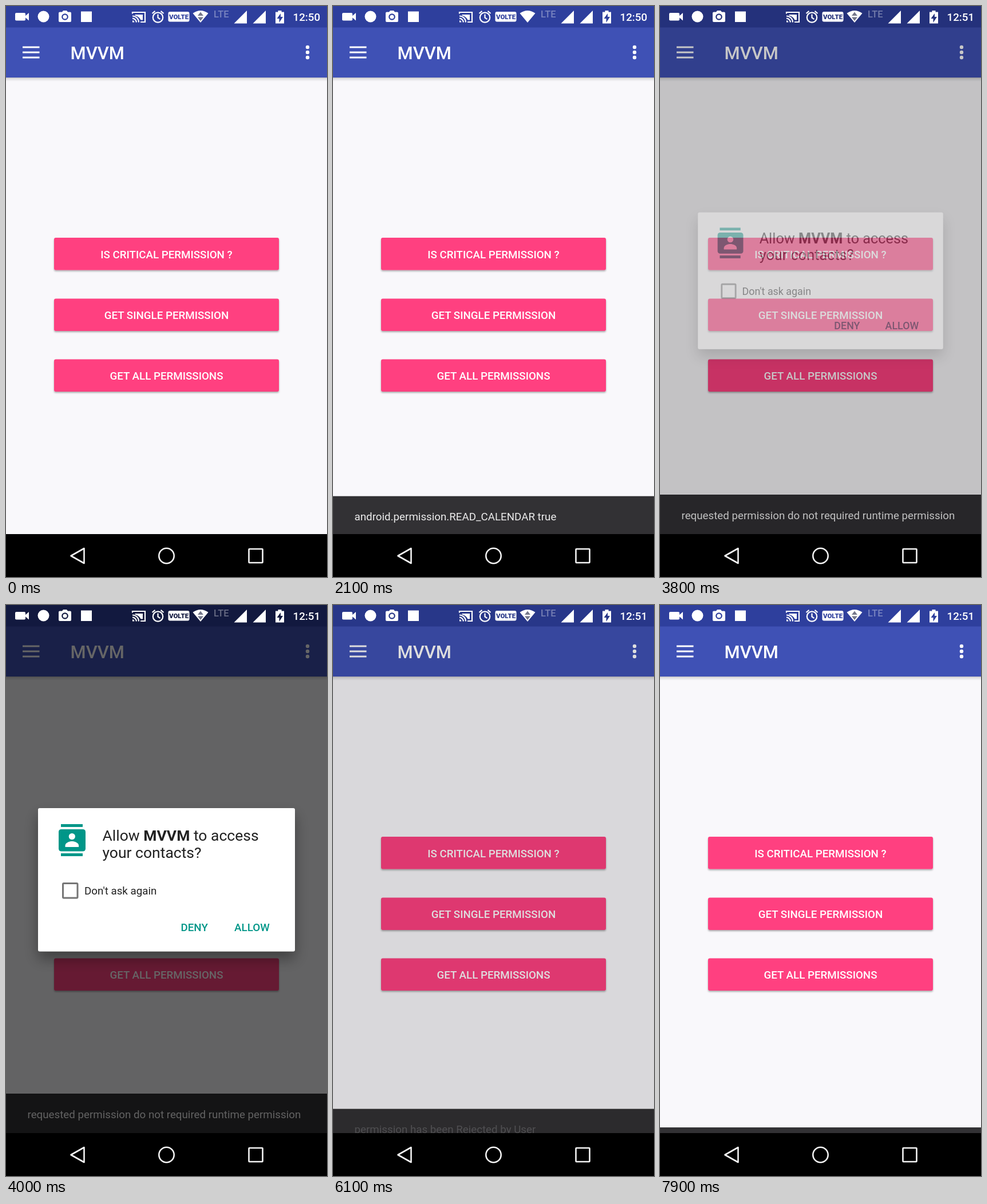
An HTML page that plays this animation: 561x998 px, repeating every 8 s.

```html
<!DOCTYPE html>
<html lang="en">
<head>
<meta charset="utf-8">
<title>Permission demo</title>
<style>
  html, body { margin: 0; width: 100%; height: 100%; overflow: hidden; background: #000; }
  svg { display: block; width: 100vw; height: 100vh; }
  text { font-family: Roboto, "Noto Sans", sans-serif; font-size: 18.75px; white-space: pre; }
  .medium { font-weight: 500; }
  .hole { fill: currentColor; }
</style>
</head>
<body>
<svg id="stage" viewBox="0 0 561 998">
  <defs>
    <linearGradient id="edge" x2="0" y2="1">
      <stop offset="0" stop-color="#000" stop-opacity=".27"/>
      <stop offset=".4" stop-color="#000" stop-opacity=".1"/>
      <stop offset="1" stop-color="#000" stop-opacity="0"/>
    </linearGradient>
    <filter id="lift" x="-5%" y="-20%" width="110%" height="150%">
      <feDropShadow dx="0" dy="2" stdDeviation="1.5" flood-opacity=".32"/>
    </filter>
    <filter id="float" x="-15%" y="-20%" width="130%" height="150%">
      <feDropShadow dx="0" dy="13" stdDeviation="12" flood-opacity=".36"/>
    </filter>
    <clipPath id="denyClip"><rect x="290" y="535" width="80" height="56" rx="3"/></clipPath>
  </defs>

  <rect width="561" height="998" fill="#f9f8fb"/>
  <rect y="124" width="561" height="8" fill="url(#edge)"/>
  <rect width="561" height="125" fill="#3f51b5"/>
  <rect width="561" height="37.5" fill="#2e3f9d"/>

  <g fill="#fff">
    <path d="M29 70.5h29.5v3H29zM29 79.5h29.5v3H29zM29 88.5h29.5v3H29z"/>
    <text class="medium" x="112.5" y="93" style="font-size:31px">MVVM</text>
    <circle cx="527" cy="72" r="3.2"/>
    <circle cx="527" cy="81" r="3.2"/>
    <circle cx="527" cy="90" r="3.2"/>
  </g>

  <g id="buttons"></g>

  <g id="snack">
    <rect width="561" height="80" fill="#323134"/>
    <text id="message" x="37.5" y="42.5" fill="#fff"></text>
  </g>

  <rect id="dim" width="561" height="998"/>

  <g id="dialog">
    <rect x="56" y="355" width="449" height="250.5" rx="3" fill="#fff" filter="url(#float)"/>
    <g fill="#009688">
      <path d="M96 383h38v5H96zM96 434h38v5H96z"/>
      <rect x="92" y="392" width="47" height="38.5" rx="4.5"/>
    </g>
    <g fill="#fff">
      <circle cx="115.3" cy="404.5" r="5.6"/>
      <path d="M103.5 423v-2.500c0-5 7-7.500 11.800-7.500s11.800 2.500 11.800 7.500v2.500z"/>
    </g>
    <g fill="#212121">
      <text x="168.500" y="411.500" style="font-size:26.500px">Allow <tspan font-weight="700">MVVM</tspan> to access</text>
      <text x="168.500" y="442" style="font-size:26.500px">your contacts?</text>
      <text x="137" y="506">Don't ask again</text>
    </g>
    <rect x="99.500" y="486.500" width="25.500" height="25.500" rx="1.500" fill="none" stroke="#757575" stroke-width="3"/>
    <circle id="denyRipple" cx="330" cy="562" clip-path="url(#denyClip)"/>
    <g class="medium" fill="#009688">
      <text x="305.500" y="569.500">DENY</text>
      <text x="399" y="569.500">ALLOW</text>
    </g>
  </g>

  <g fill="#fff">
    <rect x="16" y="12" width="18" height="13.500" rx="2"/>
    <path d="M33 18l7-6v13.500l-7-6z"/>
    <circle cx="65.500" cy="18.500" r="10"/>
    <path d="M94 10.500h4l2-2.500h6l2 2.500h4q2 0 2 2v13.500q0 2-2 2H94q-2 0-2-2V12.500q0-2 2-2z"/>
    <circle class="hole" cx="103" cy="19" r="5.800"/>
    <circle cx="103" cy="19" r="3.600"/>
    <rect x="131" y="9.500" width="19" height="18.500"/>

    <g fill="none" stroke="#fff" stroke-width="2.200">
      <path d="M221 13.500V11h22v17h-8M221 17.500a11 11 0 0 1 11 11M221 21.700a6.800 6.800 0 0 1 6.800 6.800"/>
      <circle cx="265.500" cy="20" r="8.700"/>
      <path d="M265.500 14.500v6l4 2.600M255.500 13l5-4.200M275.500 13l-5-4.200"/>
    </g>
    <path d="M221 25.200a3.300 3.300 0 0 1 3.300 3.300H221zM225.500 15H239v9.500h-3.500q-2.500-6-10-8z"/>

    <rect x="283.500" y="10" width="37" height="17.500" rx="3"/>
    <text class="hole" x="302" y="22.800" text-anchor="middle" font-weight="800" style="font-size:11.500px">VOLTE</text>
    <path d="M326.500 12.800q13.500-9.600 27 0L340 29z"/>
    <path id="arrowUp" d="M340 10.500l5 6.500h-10z" fill="#74778a"/>
    <path id="arrowDown" d="M335 19.500h10l-5 6.500z" fill="#74778a"/>
    <text class="medium" x="363" y="20" opacity=".36" style="font-size:16.500px">LTE</text>
    <path d="M421 8v22.500h-22.500zM454 8v22.500h-22.500z"/>
    <path d="M475.500 8h6v2.500h4.500v20h-15v-20h4.500z"/>
    <path class="hole" d="M480 13v6h4l-6.500 10v-7h-4z"/>
    <text class="medium" id="clock" x="501.500" y="26"></text>
  </g>

  <rect y="923" width="561" height="75"/>
  <g fill="none" stroke="#f4f4f4" stroke-width="2.600">
    <path d="M113.500 961l23-13v26z" stroke-linejoin="round"/>
    <circle cx="280.500" cy="961" r="13.200"/>
    <rect x="424.500" y="949" width="24" height="24" rx="1"/>
  </g>
</svg>
<script>
const LOOP = 8000, STEP = 100;
const REST = 854, HIDDEN = 923, SLIDE = 250, SHOWN = 1756;
const SNACKS = [
  [314, "android.permission.READ_CALENDAR true"],
  [3200, "requested permission do not required runtime permission"],
  [6000, "permission has been Rejected by User"]
];
const BUTTONS = [
  { y: 405, label: "IS CRITICAL PERMISSION ?", tap: 60 },
  { y: 511.5, label: "GET SINGLE PERMISSION", tap: 3060 },
  { y: 617.5, label: "GET ALL PERMISSIONS" }
];

const $ = id => document.getElementById(id);
const clamp = v => Math.max(0, Math.min(1, v));
const ramp = (t, start, length) => clamp((t - start) / length);
const set = (el, attrs) => {
  for (const key in attrs) el.setAttribute(key, attrs[key]);
};

// Cubic bezier (.4, 0, .2, 1), solved by bisection
function ease(x) {
  if (x <= 0 || x >= 1) return clamp(x);
  let lo = 0, hi = 1, u;
  for (let i = 0; i < 24; i++) {
    u = (lo + hi) / 2;
    const v = 1 - u;
    const bx = 1.2 * v * v * u + 0.6 * v * u * u + u * u * u;
    if (bx < x) lo = u; else hi = u;
  }
  return u * u * (3 - 2 * u);
}

$("buttons").innerHTML = BUTTONS.map(({ y, label }, i) => `
  <clipPath id="clip${i}"><rect x="84" y="${y}" width="393" height="56.500" rx="3"/></clipPath>
  <rect x="84" y="${y}" width="393" height="56.500" rx="3" fill="#ff3f80" filter="url(#lift)"/>
  <g clip-path="url(#clip${i})">
    <rect id="press${i}" x="84" y="${y}" width="393" height="57"/>
    <circle id="ripple${i}" cx="340" cy="${y + 28}"/>
  </g>
  <text class="medium" x="280.500" y="${y + 35.5}" text-anchor="middle" fill="#fff">${label}</text>`).join("");

function drawRipples(t) {
  BUTTONS.forEach(({ tap }, i) => {
    const age = tap === undefined ? -1 : t - tap;
    const level = age < 0 ? 0 : ramp(age, 0, 120) * (1 - ramp(age, 340, 240));
    set($("press" + i), { opacity: 0.055 * level });
    set($("ripple" + i), { r: 25 + 0.265 * Math.max(0, age), opacity: 0.035 * level });
  });
  const deny = ramp(t, 5800, 200);
  set($("denyRipple"), { r: 15 + 50 * deny, opacity: 0.12 * Math.min(1, deny * 2) });
}

function drawSnack(t) {
  const [start, message] = SNACKS.filter(s => s[0] <= t).pop() || SNACKS[0];
  const age = t - start;
  const shown = ease(age / SLIDE) - ease((age - SHOWN) / SLIDE);
  const y = HIDDEN - (HIDDEN - REST) * shown;
  $("message").textContent = message;
  set($("message"), { opacity: 0.96 * ramp(age, 50, 240) * (1 - ramp(age, SHOWN + 20, 180)) });
  set($("snack"), {
    transform: `translate(0 ${y.toFixed(2)})`,
    visibility: shown > 0.001 ? "visible" : "hidden"
  });
}

function drawDialog(t) {
  const enter = ramp(t, 3690, 300);
  const leave = ramp(t, 5880, 160);
  const dim = 0.6 * (enter - ramp(t, 5900, 256));
  const scale = 0.9 + 0.1 * ease(enter);
  set($("dim"), { opacity: dim });
  set($("dialog"), {
    opacity: enter * (1 - leave),
    transform: `translate(280.500 480) scale(${scale}) translate(-280.500 -480)`
  });
  $("stage").style.color = `rgb(${[46, 63, 157].map(c => Math.round(c * (1 - dim)))})`;
}

function drawStatus(t) {
  $("clock").textContent = t < 3800 ? "12:50" : "12:51";
  set($("arrowUp"), { opacity: t < 900 || t >= 3700 ? 1 : 0 });
  set($("arrowDown"), { opacity: t < 900 || t >= 2900 ? 1 : 0 });
}

function draw(now) {
  const t = Math.floor((now % LOOP) / STEP) * STEP;
  drawRipples(t);
  drawSnack(t);
  drawDialog(t);
  drawStatus(t);
}

const origin = performance.now();
function tick() {
  draw(performance.now() - origin);
  requestAnimationFrame(tick);
}
tick();
</script>
</body>
</html>
```
